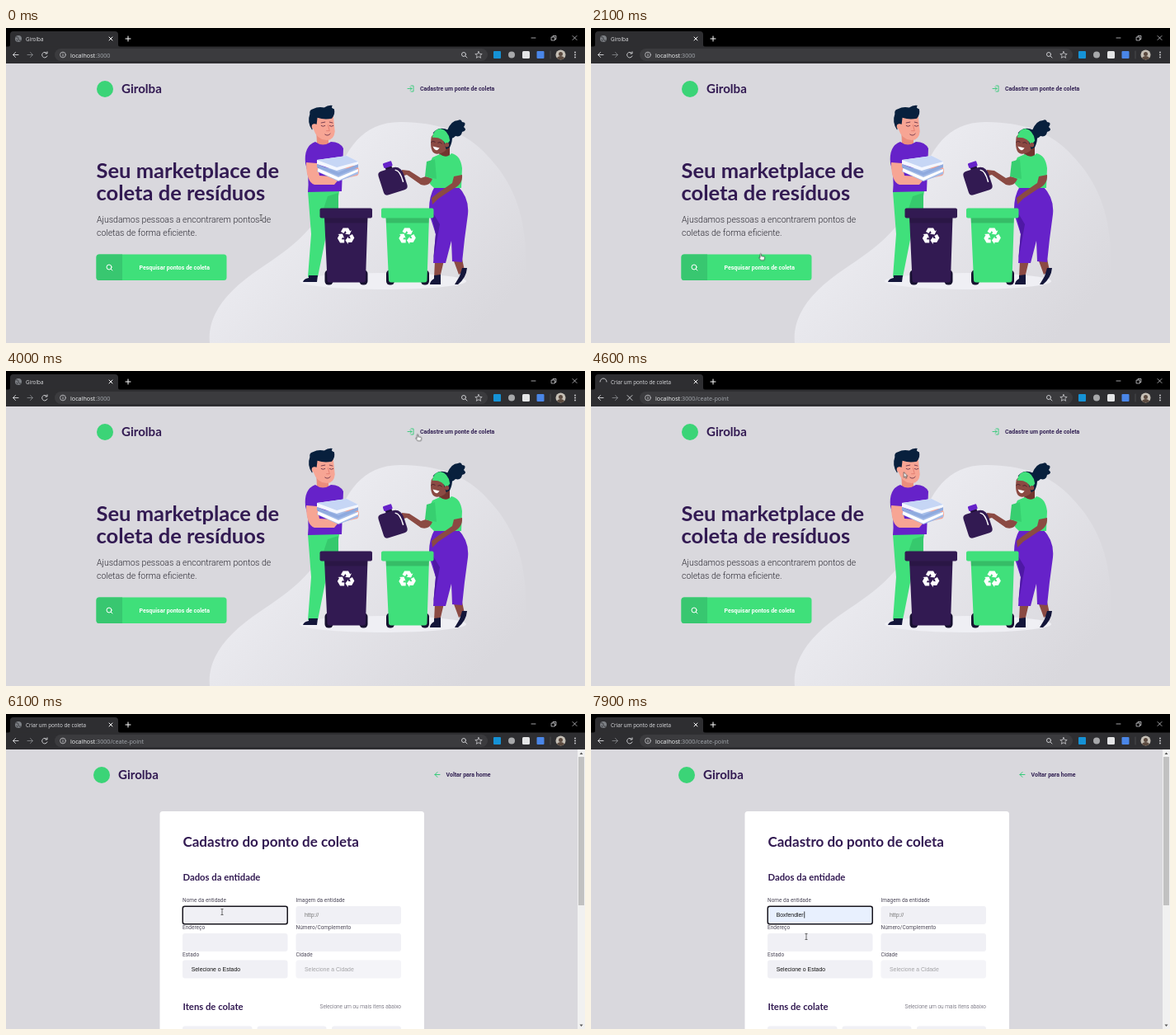
An HTML page that plays this animation: 702 px wide and 382 px high, repeating every 8 s.

```html
<!DOCTYPE html>
<html lang="pt">
<head>
<meta charset="utf-8">
<title>Pontos de coleta</title>
<style>
html, body { margin: 0; width: 100%; height: 100%; overflow: hidden; background: #d9d8dd; }
svg { display: block; width: 702px; height: 382px; }
.ui { font-family: "Open Sans", "Noto Sans", sans-serif; }
.head { font: 700 15.1px Lato, sans-serif; fill: #321a52; }
.rob { font-family: Roboto, sans-serif; fill: #322153; }
.lbl { font-size: 6.5px; fill: #4c4859; }
.field { font: 6.9px "Liberation Sans", Arial, sans-serif; }
.line { fill: none; stroke: #c9cacd; stroke-linecap: round; stroke-linejoin: round; }

/* 1% is 80 ms */
.show { animation: 8s step-end infinite; visibility: hidden; }
.home { animation-name: home; }
.form { animation-name: form; }
.idle1 { animation-name: idle1; }
.next { animation-name: next; }
.busy { animation-name: busy; }
.still { animation-name: still; }
.focus { animation-name: focus; }
.fill { animation-name: fill; }
.t1 { animation-name: t1; }
.t2 { animation-name: t2; }
.t3 { animation-name: t3; }
.caret { animation-name: caret; }
.ibeam { animation-name: ibeam; }
.arrow { animation-name: arrow; }
.hand { animation-name: hand; }
@keyframes home { 0% { visibility: visible } 58.75%, to { visibility: hidden } }
@keyframes form { 0% { visibility: hidden } 58.75%, to { visibility: visible } }
@keyframes idle1 { 0% { visibility: visible } 56.25%, to { visibility: hidden } }
@keyframes next { 0% { visibility: hidden } 56.25%, to { visibility: visible } }
@keyframes busy { 0% { visibility: hidden } 56.25% { visibility: visible } 58.75%, to { visibility: hidden } }
@keyframes still { 0% { visibility: visible } 56.25% { visibility: hidden } 58.75%, to { visibility: visible } }
@keyframes focus { 0% { visibility: hidden } 70%, to { visibility: visible } }
@keyframes fill { 0% { visibility: hidden } 93.75%, to { visibility: visible } }
@keyframes t1 { 0% { visibility: hidden } 85% { visibility: visible } 86.25%, to { visibility: hidden } }
@keyframes t2 { 0% { visibility: hidden } 86.25% { visibility: visible } 91.25%, to { visibility: hidden } }
@keyframes t3 { 0% { visibility: hidden } 91.25%, to { visibility: visible } }
@keyframes caret { 0% { visibility: hidden } 70% { visibility: visible } 76.25% { visibility: hidden } 82.5% { visibility: visible } 85%, to { visibility: hidden } }
@keyframes ibeam { 0% { visibility: visible } 1.25% { visibility: hidden } 68.75%, to { visibility: visible } }
@keyframes arrow { 0% { visibility: hidden } 1.25% { visibility: visible } 26.25% { visibility: hidden } 37.5% { visibility: visible } 50% { visibility: hidden } 56.25% { visibility: visible } 68.75%, to { visibility: hidden } }
@keyframes hand { 0% { visibility: hidden } 26.25% { visibility: visible } 37.5% { visibility: hidden } 50% { visibility: visible } 56.25%, to { visibility: hidden } }

.mouse { animation: move 8s linear infinite; }
@keyframes move {
  0% { transform: translate(309px, 230px) }
  7.5%, 10% { transform: translate(347px, 204px) }
  15%, 16% { transform: translate(364px, 215px) }
  20%, 21.25% { transform: translate(318px, 246px) }
  22.5%, 25% { transform: translate(246px, 268px) }
  27.5%, 36.25% { transform: translate(165px, 279px) }
  37.5% { transform: translate(240px, 166px) }
  38.75% { transform: translate(312px, 102px) }
  45%, 47.5% { transform: translate(446px, 86px) }
  51.25%, 55% { transform: translate(524px, 72px) }
  57.5% { transform: translate(381px, 122px) }
  58.75% { transform: translate(205px, 182px) }
  62.5% { transform: translate(208px, 206px) }
  68.75%, 92.5% { transform: translate(262px, 240px) }
  96.25%, to { transform: translate(261px, 270px) }
}
.spin { animation: spin .8s linear infinite; transform-origin: 15px 13px; }
@keyframes spin { to { transform: rotate(360deg) } }
</style>
</head>
<body>
<svg viewBox="0 0 702 382">
<defs>
  <linearGradient id="glow" gradientUnits="userSpaceOnUse" x1="370" y1="180" x2="570" y2="370">
    <stop stop-color="#ebebf0"/><stop offset="1" stop-color="#d9d8dd"/>
  </linearGradient>
  <path id="turn" d="M-6-5.6-3.4-10H3L5.2-6.2 7-7.2 4.600-2-1-2.8.7-4-.6-6.400-2.600-3.500Z"/>
  <g id="loop" fill="#fff">
    <use href="#turn"/><use href="#turn" transform="rotate(120)"/><use href="#turn" transform="rotate(240)"/>
  </g>
  <g id="bin">
    <rect x="6" y="75" width="10" height="18" rx="4.500" fill="#171030"/>
    <rect x="48" y="75" width="10" height="18" rx="4.500" fill="#171030"/>
    <path d="M5.500 10H58L55.500 87Q55.500 90 52.500 90H12Q9 90 9 87Z"/>
    <path d="M5.500 11H58L57.500 18H6Z" fill="#000" opacity=".16"/>
    <rect width="63.500" height="12" rx="2"/>
    <use href="#loop" x="31.500" y="34"/>
  </g>
</defs>

<rect width="702" height="382" fill="#d9d8dd"/>

<g class="show home">
  <path fill="url(#glow)" d="M247 382C244 352 262 322 309 291 350 264 382 239 398 189 411 148 432 113 480 114 537 115 567 132 596 169 624 205 632 247 630 300L622 382Z"/>
  <circle cx="120" cy="74" r="10" fill="#3bd477"/>
  <text class="head" x="140" y="79">Girolba</text>
  <g class="line" style="stroke:#34cb79" stroke-width=".9">
    <path d="M487 73.500H492M490 71.500 492 73.500 490 75.500M491 70H494V77H491"/>
  </g>
  <text class="rob" x="502" y="76" font-size="7" font-weight="700">Cadastre um ponte de coleta</text>
  <g class="head" style="font-size:25.500px">
    <text x="109.500" y="182">Seu marketplace de</text>
    <text x="109.500" y="209">coleta de resíduos</text>
  </g>
  <g class="rob" style="fill:#2c2a33" font-size="10.500" font-weight="300">
    <text x="110" y="236">Ajusdamos pessoas a encontrarem pontos de</text>
    <text x="110" y="252">coletas de forma eficiente.</text>
  </g>
  <rect x="109.500" y="274.500" width="158" height="31.500" rx="3.500" fill="#3fe07a"/>
  <path d="M141 274.500H113Q109.500 274.500 109.500 278V302.500Q109.500 306 113 306H141Z" fill="#38c770"/>
  <g class="line" style="stroke:#fff"><circle cx="125" cy="290" r="3"/><path d="M127.200 292.200 129 294"/></g>
  <text x="161.500" y="293" class="rob" style="fill:#fff" font-size="7" font-weight="700">Pesquisar pontos de coleta</text>

  <ellipse cx="457" cy="307" rx="101" ry="10" fill="#efeff4"/>

  <!-- man -->
  <path d="M366 198H404L400 222 390 242 378 302H366L370 250Z" fill="#40e07b"/>
  <path d="M390 204 403 200V222H384Z" fill="#36c96d"/>
  <path d="M367 300H378L377 308H360Q361 304 367 303Z" fill="#14163a"/>
  <path d="M376 122H391V140Q385 146 377 140Z" fill="#ec8d7c"/>
  <g transform="translate(384 93) scale(.92 .88) translate(-384 -92)">
    <path d="M371 108Q383 100 398 108L400 129Q399 141 389 141 376 140 372 126Z" fill="#f7a594"/>
    <path d="M370 127Q363 116 367 105 366 99 371 98 378 94 386 96 391 92 397 93 394 96 399 98 401 105 396 111 386 113 377 110L376 119 372 119Z" fill="#08203d"/>
    <circle cx="373" cy="122" r="3.500" fill="#f7a594"/>
    <g class="line" style="stroke:#5d2942" stroke-width=".9">
      <path d="M382 121Q384 123 387 121M393 121Q395 123 398 121M387 133Q391 136 394 132M382 117 387 116M393 116 397 117"/>
    </g>
    <path d="M391 120 393 128H389" class="line" style="stroke:#e17c70"/>
  </g>
  <path d="M375 138Q384 145 394 138 405 138 409 146L407 198 366 199Q368 180 363 164 361 143 375 138Z" fill="#6622c9"/>
  <path d="M364 163 377 164 380 179 396 180 403 184 398 190 374 190Q364 187 364 163Z" fill="#f7a594"/>
  <path d="M407 166 426 167Q430 175 426 179L408 183Z" fill="#f7a594"/>
  <path d="M377 174 403 186 427 177V171L379 169Z" fill="#a4bce8"/>
  <path d="M378 170 403 181 427 171V174L403 185 378 174Z" fill="#fff"/>
  <path d="M377 165 403 175 427 165V169L403 179 377 169Z" fill="#8faade"/>
  <path d="M377 160 413 155 427 162V165L401 173 377 165Z" fill="#f4f7ff"/>
  <path d="M377 160 413 155 427 162 401 169Z" fill="#c6d6f5"/>

  <!-- woman -->
  <path d="M535 124Q540 112 548 112 552 110 553 114 559 114 555 120 560 124 553 126 552 133 545 131 540 137 534 132Z" fill="#08203d"/>
  <path d="M520 282H531L526 303H519ZM542 280H553L556 294 549 299Z" fill="#8b4a43"/>
  <path d="M520 192H548Q562 206 560 226L556 256 553 284 541 283 540 258 533 285H518L521 250 513 225Q512 205 520 192Z" fill="#6622c9"/>
  <path d="M514 218 521 250 518 282 526 238Z" fill="#4e18a5"/>
  <path d="M519 300 527 299 527 311H514Q514 307 519 304ZM553 291 559 291Q558 303 548 311H544L550 301Z" fill="#14163a"/>
  <path d="M526 143H538V157H525Z" fill="#72352f"/>
  <path d="M517 157 526 153Q534 159 540 152 551 154 553 170L552 194H519Q510 188 510 172Z" fill="#40e07b"/>
  <path d="M509 180 517 183Q513 193 503 190L486 178 479 180 480 172 489 173 503 182Z" fill="#8b4a43"/>
  <path d="M510 162 520 159 522 183 508 180Z" fill="#37cf70"/>
  <path d="M543 180 553 178Q554 190 542 195L524 207 517 214 516 206 525 199 541 188Z" fill="#8b4a43"/>
  <g transform="translate(522 122) scale(.9) translate(-521 -122)">
    <path d="M514 133Q520 123 534 131L537 146Q532 157 520 156 511 153 514 133Z" fill="#8b4a43"/>
    <path d="M516 128Q524 118 537 124 546 132 539 147L534 150 529 134Z" fill="#08203d"/>
    <path d="M515 134Q517 123 526 122 537 124 539 138L534 145Q530 133 515 134Z" fill="#40e07b"/>
    <circle cx="535" cy="144" r="3" fill="#8b4a43"/>
    <path d="M516 146 525 148Q520 155 516 146Z" fill="#fff"/>
    <path d="M514 140Q516 138 519 140M523 141Q526 139 528 142" class="line" style="stroke:#3f1c28" stroke-width=".9"/>
  </g>

  <!-- jug -->
  <g transform="translate(469 185) rotate(-18)">
    <rect x="-4" y="-19" width="8" height="6" fill="#21103a"/>
    <rect x="-5.500" y="-23.500" width="11" height="6.500" rx="1.500" fill="#6622c9"/>
    <path d="M-15-10Q-15-15-10-15H5Q15-14 15-2V10Q15 15 10 15H-10Q-15 15-15 10Z" fill="#321a52"/>
    <path d="M7-11Q12-9 11.500 5" class="line" style="stroke:#fff" stroke-width="1.500"/>
  </g>
  <use href="#bin" x="380.500" y="218.500" fill="#321a52"/>
  <use href="#bin" x="455" y="218.500" fill="#40e07b"/>
</g>

<g class="show form">
  <circle cx="116" cy="74" r="10" fill="#3bd477"/>
  <text class="head" x="136" y="79">Girolba</text>
  <path class="line" style="stroke:#34cb79" d="M526 73.500H520M523 70.500 520 73.500 523 76.500"/>
  <text class="rob" x="533.500" y="76" font-size="7" font-weight="700">Voltar para home</text>
  <rect x="186.500" y="118" width="320.500" height="270" rx="3.500" fill="#fff"/>
  <g class="head">
    <text x="214.500" y="161" style="font-size:17px">Cadastro do ponto de coleta</text>
    <text x="214.500" y="202" style="font-size:11.300px">Dados da entidade</text>
    <text x="214.500" y="359" style="font-size:11.300px">Itens de colate</text>
  </g>
  <g class="rob lbl">
    <text x="214" y="228">Nome da entidade</text><text x="351.500" y="228">Imagem da entidade</text>
    <text x="214" y="261">Endereço</text><text x="351.500" y="261">Número/Complemento</text>
    <text x="214" y="294">Estado</text><text x="351.500" y="294">Cidade</text>
    <text x="479" y="357" text-anchor="end" font-weight="300">Selecione um ou mais itens abaixo</text>
  </g>
  <g fill="#f0f0f5">
    <rect x="214" y="233" width="127.500" height="22" rx="3"/><rect x="351.500" y="233" width="127.500" height="22" rx="3"/>
    <rect x="214" y="266" width="127.500" height="22" rx="3"/><rect x="351.500" y="266" width="127.500" height="22" rx="3"/>
    <rect x="214" y="298.500" width="127.500" height="22" rx="3"/><rect x="351.500" y="298.500" width="127.500" height="22" rx="3" opacity=".7"/>
    <rect x="214" y="378.500" width="84.500" height="12" rx="3"/><rect x="304.500" y="378.500" width="84" height="12" rx="3"/><rect x="395" y="378.500" width="84" height="12" rx="3"/>
  </g>
  <g class="field">
    <text x="362" y="246" fill="#777">http://</text>
    <text x="224.700" y="312" fill="#111">Selecione o Estado</text>
    <text x="362" y="312" fill="#a3a3a6">Selecione a Cidade</text>
  </g>
  <rect class="show fill" x="214" y="233" width="127.500" height="22" rx="3" fill="#e8f0fe"/>
  <rect class="show focus" x="214.250" y="233.250" width="127" height="21.500" rx="2.500" fill="none" stroke="#17151d" stroke-width="1.500"/>
  <g class="field" fill="#111">
    <rect class="show caret" x="224.700" y="239.500" width=".8" height="8"/>
    <g class="show t1"><text x="224.700" y="246">B</text><rect x="229.500" y="239.500" width=".8" height="8"/></g>
    <g class="show t2"><text x="224.700" y="246">Boxf</text><rect x="238.800" y="239.500" width=".8" height="8"/></g>
    <g class="show t3"><text x="224.700" y="246">Boxfendler</text><rect x="258.400" y="239.500" width=".8" height="8"/></g>
  </g>
  <rect x="693" y="42" width="9" height="340" fill="#f1f1f1"/>
  <rect x="694" y="52" width="7" height="180" fill="#c1c1c1"/>
  <path d="M695.500 49 697.500 46.500 699.500 49ZM695.500 376.500 697.500 379 699.500 376.500Z" fill="#555"/>
</g>

<!-- browser frame -->
<rect width="702" height="23" fill="#000"/>
<path d="M2 23Q5 23 5 20V8Q5 4 9 4H132Q136 4 136 8V20Q136 23 139 23Z" fill="#2e2e31"/>
<rect y="22.500" width="702" height="20.500" fill="#2e2e31"/>
<rect x="59" y="25" width="525" height="15" rx="7.500" fill="#3b3b3e"/>
<g class="show still">
  <circle cx="15" cy="13" r="4" fill="#7d8085"/>
  <path d="M12 11Q15 10 15 13T18 15M14 16 13 14" class="line" style="stroke:#3b3d41"/>
</g>
<g class="show busy"><path class="line spin" d="M15 9A4 4 0 0 1 15 17"/></g>
<g class="ui" font-size="6.300" fill="#dfe0e3">
  <text class="show idle1" x="24" y="15.500">Girolba</text>
  <text class="show next" x="24" y="15.500">Criar um ponto de coleta</text>
</g>
<g class="ui" font-size="7.200" fill="#f1f3f4">
  <text x="78" y="35.500">localhost<tspan fill="#a5a9af">:3000<tspan class="show next">/ceate-point</tspan></tspan></text>
</g>
<g class="line">
  <path d="M125 11 129 15M129 11 125 15M145 13H151M148 10V16" stroke="#fff"/>
  <path d="M637 12H642M687 9.500 692 14.500M692 9.500 687 14.500M661.500 11H665.500V15H661.500ZM663 11V9.500H667V13.500H665.500" stroke-width=".8"/>
  <path d="M15 32.500H8.500M11.500 29.500 8.500 32.500 11.500 35.500"/>
  <path d="M26 32.500H32.500M29.500 29.500 32.500 32.500 29.500 35.500" style="stroke:#77797d"/>
  <path class="show still" d="M49.500 30.500A3.300 3.300 0 1 0 50 34M50 28.800V31H47.600"/>
  <path class="show busy" d="M44 29.500 50 35.500M50 29.500 44 35.500"/>
  <circle cx="69" cy="32.500" r="3.400" stroke-width=".8"/><path d="M69 32.300V34M69 30.800V31" stroke-width=".9"/>
  <circle cx="555" cy="32" r="2.500"/><path d="M557 34 559 36"/>
  <path d="M573 28.500 574.200 31.300 577.200 31.500 574.900 33.400 575.600 36.300 573 34.700 570.400 36.300 571.100 33.400 568.800 31.500 571.800 31.300Z" stroke-width=".8"/>
  <path d="M660 28V37" style="stroke:#55575b" stroke-width=".7"/>
</g>
<rect x="591" y="28" width="9" height="9" rx="1" fill="#1592d6"/>
<circle cx="613" cy="32.500" r="4" fill="#a7a8aa"/>
<rect x="626" y="28" width="9" height="9" rx="1.500" fill="#e4e5e6"/>
<rect x="643.500" y="28" width="9" height="9" rx="1" fill="#4a86e8"/>
<circle cx="672.500" cy="32.500" r="6" fill="#c5bfb5"/>
<path d="M667.800 36.200Q672.500 32 677.200 36.200 672.500 41 667.800 36.200Z" fill="#5c4b40"/><circle cx="672.500" cy="31.500" r="2.500" fill="#5c4b40"/>
<g fill="#d4d5d8"><circle cx="690" cy="29.500" r=".9"/><circle cx="690" cy="32.500" r=".9"/><circle cx="690" cy="35.500" r=".9"/></g>

<g class="mouse">
  <path class="show ibeam" d="M-1.500-3.500H1.500M0-3.500V3.500M-1.500 3.500H1.500" fill="none" stroke="#333" stroke-width=".7"/>
  <path class="show arrow" d="M0 0V6.500L1.500 5.200 2.600 7.600 3.700 7.100 2.600 4.800H4.700Z" fill="#fff" stroke="#222" stroke-width=".6"/>
  <path class="show hand" d="M0 .6Q.7-.4 1.400.6V3L5 3.700Q5.700 4 5.500 5L4.800 8H.8L-1.600 4.900Q-1.500 4 0 5Z" fill="#fff" stroke="#222" stroke-width=".6"/>
</g>
</svg>
</body>
</html>
```
